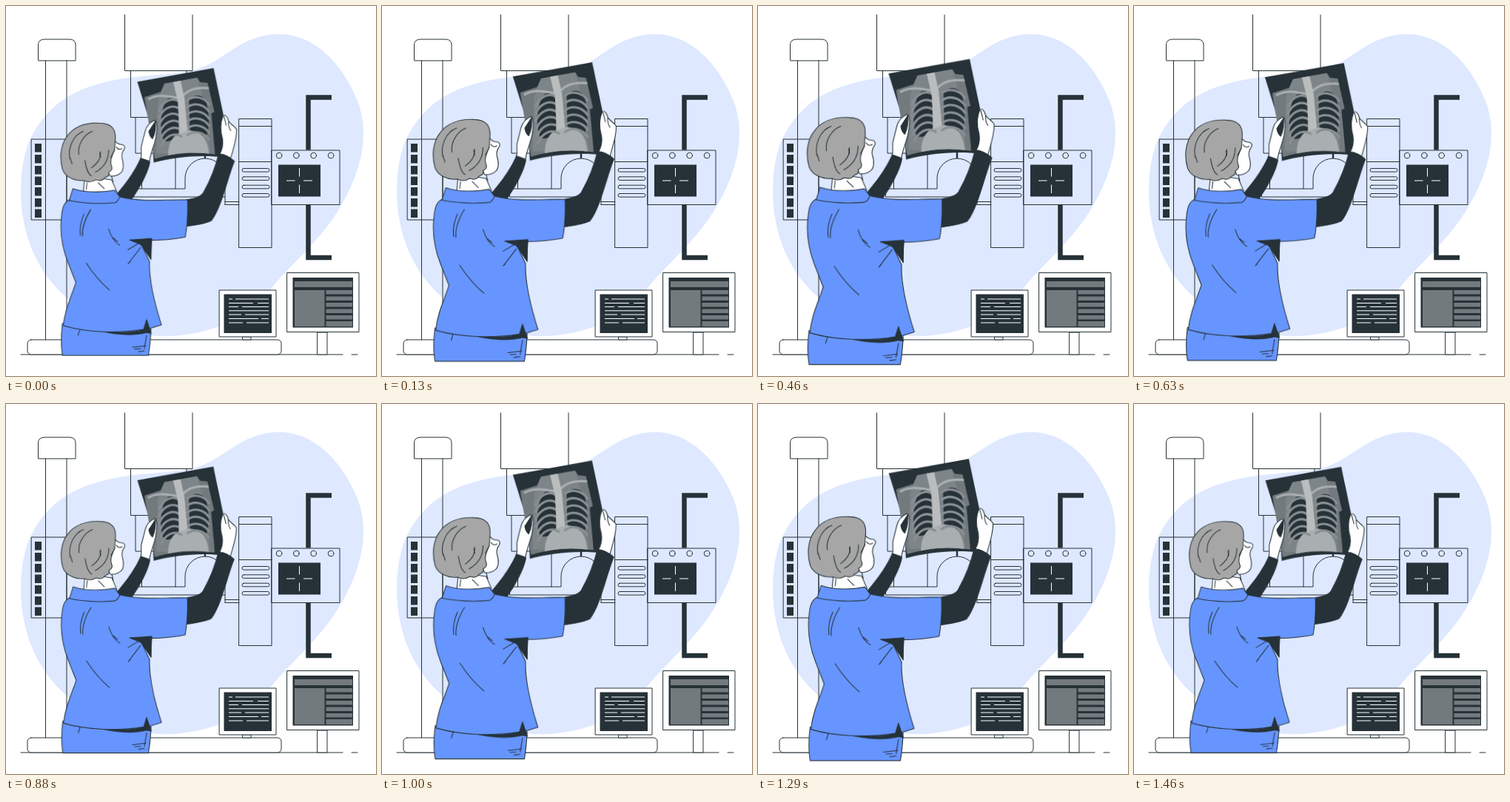
Animation of 500 by 500 pixels, one loop 1.5 s. Source, as an HTML page without scripts:

```html
<!DOCTYPE html>
<html lang="en">
<head>
<meta charset="utf-8">
<title>Radiologist</title>
<style>
  html, body { margin: 0; width: 100%; height: 100%; overflow: hidden; background: #fff; }
  svg { display: block; width: 100vw; height: 100vh; }
  .line { fill: none; stroke: #263238; stroke-width: 1; stroke-linecap: round; stroke-linejoin: round; }
  .white { fill: #fff; }
  .blue { fill: #6695ff; }
  .hair { fill: #a6a6a6; }
  .dark { fill: #263238; }
  .grey { fill: #737a7e; }
  .pale { fill: none; stroke: #fff; }
  .rib { fill: none; stroke: #899093; stroke-width: 3; stroke-linecap: round; }
  .figure { transform-origin: 193.5px 278px; animation: beat 1.5s linear infinite; }
  @keyframes beat {
    0%, 58.3%, 97.6%, 100% { transform: scale(1); }
    18.7%, 77.2% { transform: scale(1.1); }
  }
</style>
</head>
<body>
<svg viewBox="0 0 500 500">
  <defs>
    <rect id="key" class="dark" x="39" width="9" height="11.5"/>
    <rect id="slot" x="319" width="37" height="4.6" rx="2.3"/>
    <circle id="knob" cy="202" r="3.8"/>
    <rect id="bar" class="grey" x="432.500" width="35.500" height="5.500"/>
    <path id="ribL" d="M234 130C224 123 212 130 207 142"/>
    <path id="ribR" d="M245 128C254 121 267 124 274 134"/>
    <clipPath id="sheet"><path d="M187 124 209 117 214 106 258 98 262 104 272 105 281 144 277 146 282 201C255 197 230 198 201 207Z"/></clipPath>
  </defs>

  <path fill="#dee8ff" d="M367 38C423 37 459 88 475 128C493 175 479 228 449 276C424 317 388 346 359 381C328 420 286 441 227 446C163 449 102 421 63 375C27 332 15 276 22 219C30 161 68 121 123 106C169 92 214 95 253 87C294 77 315 39 367 38Z"/>

  <g class="line">
    <path d="M20 471H455M467 471H475"/>
    <rect class="white" x="29" y="451" width="343" height="20" rx="5"/>
    <path d="M53.500 73.500V451M82 73.500V451"/>
    <path class="white" d="M43.500 73.500V53Q43.500 45 52 45H86Q94 45 94 53V73.500Z"/>
    <rect x="34.500" y="180" width="47.500" height="109"/>
    <path d="M160.500 12V87.500H252V12M168.500 87.500V150.500H244V87.500M175 150.500V199H238V150.500"/>
    <path d="M183.500 199V247H229V199M229 247H242V233A27 27 0 0 1 296 233V268.500M172.500 247V258H296M183.500 247H172.500"/>
    <path d="M296 264.500H315M296 268.500H315"/>
    <path stroke-width="2.500" d="M269 190V205"/>
    <path d="M315 152.500H359V326.500H315ZM315 162.500H359M315 210.500H359"/>
    <g>
      <use href="#slot" y="219.500"/><use href="#slot" y="230.800"/>
      <use href="#slot" y="242.200"/><use href="#slot" y="253.500"/>
    </g>
    <rect x="359" y="195" width="92" height="73.500"/>
    <use href="#knob" x="369"/><use href="#knob" x="392.300"/>
    <use href="#knob" x="415.600"/><use href="#knob" x="439"/>
  </g>

  <use href="#key" y="186"/><use href="#key" y="201"/><use href="#key" y="216"/>
  <use href="#key" y="230.500"/><use href="#key" y="245"/><use href="#key" y="260"/><use href="#key" y="274.500"/>

  <rect class="dark" x="368" y="214.500" width="57" height="43"/>
  <path class="pale" d="M379 236H390.500M402 236H414M396.500 219V230.500M396.500 241.500V253"/>
  <path fill="none" stroke="#263238" stroke-width="6.500" d="M440 123.500H408.500V194.500M408.500 269V340H440"/>

  <g class="line">
    <rect class="white" x="320" y="447" width="11" height="4"/>
    <rect class="white" x="288.500" y="384" width="76.500" height="63"/>
    <rect class="white" x="421" y="441" width="13" height="30"/>
    <rect class="white" x="380" y="360.500" width="97" height="80"/>
  </g>
  <rect class="dark" x="294.500" y="389.500" width="64.500" height="52.500"/>
  <path class="pale" d="M301 396H306M310 396H355M301 401.500H334M340 401.500H355M301 406.500H314M319 406.500H355M301 411.800H355M301 417H318M323 417H355M301 422.500H341M345 422.500H355M301 428H320M325 428H355"/>
  <rect class="dark" x="387.500" y="367" width="81.500" height="67.500"/>
  <path class="grey" d="M390 372H468V380H390ZM390 384H430.500V433H390Z"/>
  <use href="#bar" y="384"/><use href="#bar" y="392.500"/><use href="#bar" y="401"/>
  <use href="#bar" y="409.500"/><use href="#bar" y="418"/><rect class="grey" x="432.500" y="426" width="35.500" height="7"/>

  <g class="figure">
    <path class="dark" d="M182 205 195 211C192 227 181 246 170 262L146 258C157 246 174 225 182 205Z"/>

    <!-- X-ray film -->
    <path class="dark" d="M177.500 103.500 280 85 293 147 295 205C264 201 230 204 199.500 212L197 166Z"/>
    <g clip-path="url(#sheet)">
      <path fill="#737a7e" d="M180 90H290V215H180Z"/>
      <path fill="#899093" d="M213 105 258 97 264 120 276 200H203L205 130Z" opacity=".5"/>
      <path class="dark" d="M219 126C229 122 234 131 234 143L233 174C226 184 214 186 212 180C206 162 210 134 219 126Z"/>
      <path class="dark" d="M247 128C253 118 269 120 271 134C275 152 274 166 271 175C261 176 252 174 248 167Z"/>
      <path fill="#a9aeb0" d="M219 207C217 184 228 170 245 169C263 168 273 180 274 204Z"/>
      <g class="rib">
        <use href="#ribL"/><use href="#ribL" y="9.500"/><use href="#ribL" y="19"/>
        <use href="#ribL" x="1" y="28.500"/><use href="#ribL" x="2" y="38"/><use href="#ribL" x="3" y="47"/>
        <use href="#ribR"/><use href="#ribR" y="9.500"/><use href="#ribR" y="19"/>
        <use href="#ribR" y="28.500"/><use href="#ribR" y="38"/><use href="#ribR" y="47"/>
      </g>
      <path fill="none" stroke="#a9aeb0" stroke-width="3" d="M192 127C206 119 219 123 232 125M239 122C248 112 260 111 274 112"/>
      <path fill="#b9bdbe" d="M225 101 235 99 241 126 245 169 234 173 232 130Z"/>
    </g>

    <!-- Hands and near arm -->
    <g class="line">
      <path class="white" d="M201 155C194 158 190 162 188 170L183 190C182 198 184 203 182 206L194 210C195 198 202 187 203 174C204 166 205 158 201 155Z"/>
      <path class="dark" d="M202 156 193 170Q194 177 198 180 203 170 202 156Z"/>
      <path class="white" d="M293 149C296 147 299 151 300 156C303 161 310 164 311 168C311 181 307 192 303 206L288 201C292 194 293 187 292 180C289 170 289 158 293 149Z"/>
      <path d="M300 157Q300 165 303 169M294 150 297 162"/>
      <path class="dark" d="M287 200Q299 201 308 210C299 231 291 272 277 290C266 295 254 296 241 298L243 262C255 260 264 258 267 251Q280 228 287 200Z"/>
    </g>

    <!-- Trousers and undershirt -->
    <path class="line blue" d="M77 428C75 444 75 459 77 471H192.500Q195 456 196 436Z"/>
    <path class="line" d="M101 434 98 444M171 460 189 458M174 462.500 182 462M179 466 187 465M190 444 187 462"/>
    <path class="dark" d="M117 436C145 441 169 441 186 436L190 423 197 442 190 441C166 447 140 442 117 436ZM168 316 197 314 196 343 181 321Z"/>

    <!-- Head -->
    <g class="line">
      <path class="white" d="M107 230 105 252C120 259 143 256 150 251L143 235Z"/>
      <path class="white" d="M146 180C149 187 154 188 158 188Q162 190 160 194C157 198 156 201 157 206C160 215 159 223 155 226Q149 231 141 230L132 210Z"/>
      <path d="M149 191Q153 196 157 193M143 230 145 238M110 239 109 248M125 239 133 247"/>
      <path class="hair" d="M77 221C73 206 74 189 83 177C92 164 108 158 127 159C143 159 149 167 148 181L147 195C144 202 140 210 143 217Q145 222 139 225Q141 230 134 232Q130 238 122 235Q114 240 106 236C94 237 81 232 77 221Z"/>
      <path d="M87 207C84 193 91 175 105 170M99 201C97 188 106 174 117 170M87 205 90 214M127 199C130 206 122 215 116 219M139 195C139 209 132 219 121 225M128 197 128 205M107 209C109 220 111 227 116 230M147 195 142 205"/>
    </g>

    <!-- Scrubs top -->
    <g class="line">
      <path class="blue" d="M88 261C79 265 77 272 76 282C73 305 77 327 84 345L95 373C90 390 81 405 78 431C109 440 150 442 186 436L190 423 194 435 210 430C201 402 193 372 194 345L183 322 167 316Q214 318 242 312Q246 290 245 262C217 261 187 266 154 258Z"/>
      <path class="blue" d="M91 247C108 253 132 252 147 249L154 258Q151 265 147 266Q116 269 86 263Z"/>
      <path d="M115 275C107 288 103 299 104 311M106 281C101 292 100 301 101 310M139 301C142 311 147 319 154 323M151 318 145 313M165 329 185 317M166 347 182 326M109 347C118 361 127 372 140 383M168 345 165 348"/>
      <path class="dark" d="M168 316 197 314C196 326 196 335 196 342Q190 329 181 321Z"/>
    </g>
  </g>
</svg>
</body>
</html>
```
